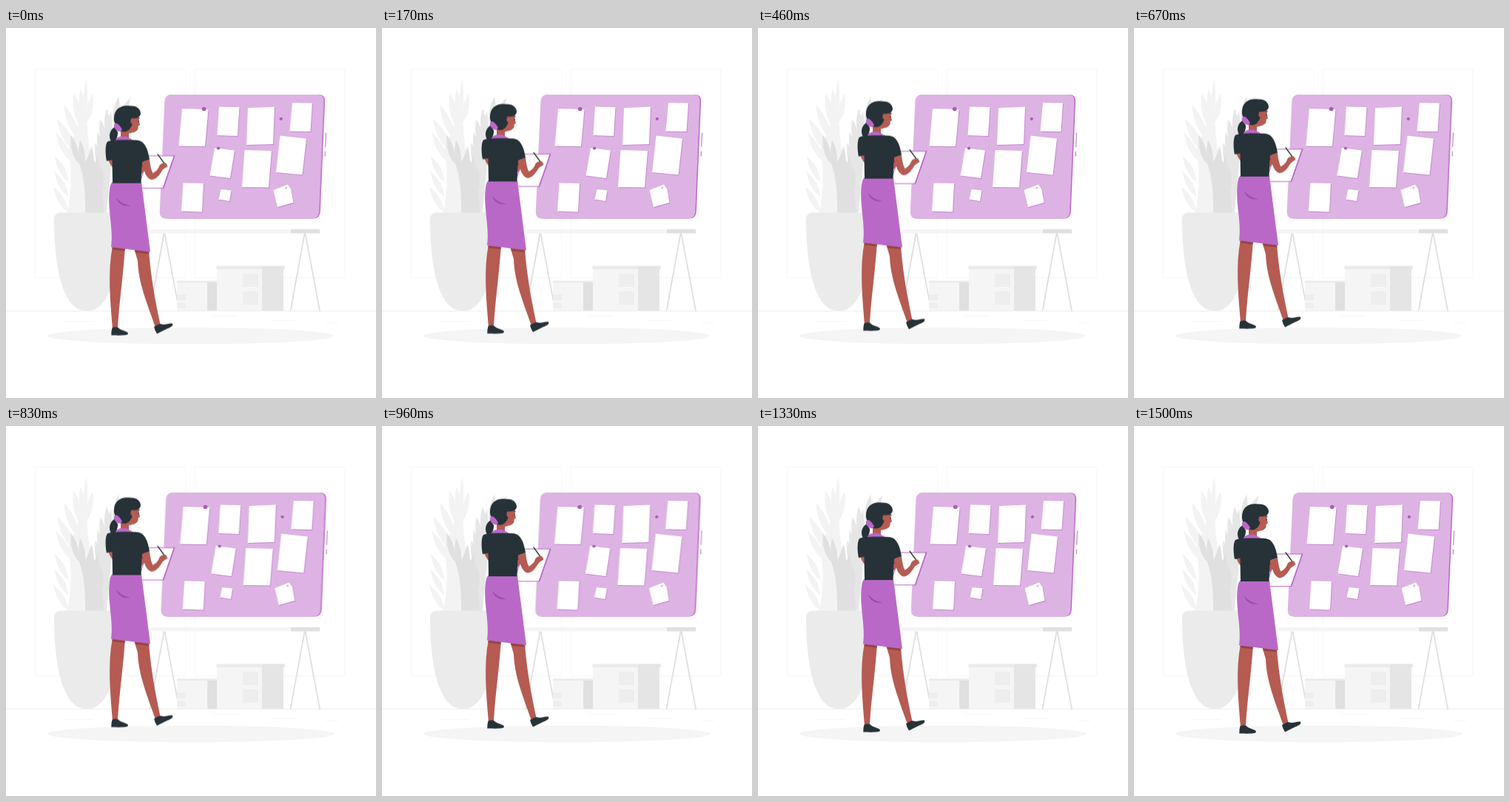
Animation, 500 px wide and 500 px high, one loop 1540 ms. Source, as an HTML page without scripts:

```html
<!DOCTYPE html>
<html lang="en">
<head>
<meta charset="utf-8">
<title>Planning board</title>
<style>
  html, body { margin: 0; width: 100%; height: 100%; overflow: hidden; background: #fff; }
  svg { display: block; width: 100%; height: 100%; }
  .board { animation: shake 1.54s linear infinite; }
  .woman { animation: float 1.54s linear infinite; }
  @keyframes float {
    0% { transform: translateY(-.3px); }
    47% { transform: translateY(-10px); }
    95.7%, 100% { transform: translateY(0); }
  }
  @keyframes shake {
    0% { transform: translateX(-.17px); }
    8.05%, 86% { transform: translateX(-1px); }
    17.8%, 76.2% { transform: translateX(2px); }
    27.5%, 47%, 66.5% { transform: translateX(-4px); }
    37.3%, 56.8% { transform: translateX(4px); }
    95.7%, 100% { transform: translateX(0); }
  }
  .dark { fill: #263238; }
  .skin { fill: #b55b52; }
  .purple { fill: #ba68c8; }
  .line { fill: none; stroke-linecap: round; }
</style>
</head>
<body>
<svg viewBox="0 0 500 500">
  <defs>
    <path id="leaf" d="M0 0C-6-12-5-26 0-40C5-26 6-12 0 0Z"/>
    <path id="panel" d="M224 90H421Q430 90 429.600 99L423.300 248Q422.800 257.500 414 257.500H216Q207.300 257.500 207.800 248L214.400 99Q215 90 224 90Z"/>
    <g id="notes">
      <path d="M238 109L273.500 110L269 160L233.500 159.500Z"/>
      <path d="M288 106.500L315.500 107L313 146L285.500 145Z"/>
      <path d="M327 108L363 106.500L361 157L325 158Z"/>
      <path d="M387 101L414 101.500L411.500 140L383.500 139.500Z"/>
      <path d="M370.500 145.500L406 149.500L400.500 198.500L365 195Z"/>
      <path d="M282 162L309 165.500L303 203L275.500 199.500Z"/>
      <path d="M322.500 165L359 166L355 215.500L319 215Z"/>
      <path d="M239.500 209.500L267 210L265 248.500L237 247.500Z"/>
      <path d="M290.500 218L304.500 219.500L302 234L287.500 231.500Z"/>
      <path d="M361.500 219L381 211.500L385.500 218L388.500 236L367 242Z"/>
    </g>
  </defs>

  <!-- room -->
  <g fill="none" stroke="#f7f7f7">
    <rect x="39.500" y="55.500" width="203" height="282" rx="1"/>
    <rect x="255" y="55.500" width="203" height="282" rx="1"/>
    <path stroke="#efefef" d="M0 382.500H500"/>
    <path d="M78 396.500H118M278 389.500H312M360 395.500H390M432 398.500H449"/>
  </g>
  <ellipse cx="249.500" cy="416" rx="194" ry="11.300" fill="#f5f5f5"/>

  <!-- plant -->
  <g fill="#f3f3f3">
    <path d="M108 69C112 84 109 104 109 122C111 165 120 200 120 250H83C88 220 90 200 84 165L98 130C105 110 104 88 108 69Z"/>
    <use href="#leaf" transform="translate(109 128) rotate(12)"/>
    <use href="#leaf" transform="translate(106 126) rotate(-7) scale(1.100)"/>
    <use href="#leaf" transform="translate(103 138) rotate(-13) scale(1.300)"/>
    <use href="#leaf" transform="translate(98 150) rotate(-23) scale(1.250)"/>
    <use href="#leaf" transform="translate(94 168) rotate(-29) scale(1.300)"/>
    <use href="#leaf" transform="translate(88 180) rotate(-28) scale(1.100)"/>
    <use href="#leaf" transform="translate(84 208) rotate(-27)"/>
    <use href="#leaf" transform="translate(84 228) rotate(-28)"/>
    <use href="#leaf" transform="translate(84 249) rotate(-30)"/>
  </g>
  <g fill="#e6e6e6">
    <path d="M142 112C148 150 140 200 136 250H118C126 210 128 150 142 112Z"/>
    <use href="#leaf" transform="translate(150 130) rotate(27)"/>
    <use href="#leaf" transform="translate(146 132) rotate(9)"/>
    <use href="#leaf" transform="translate(139 153) rotate(-4) scale(1.100)"/>
    <use href="#leaf" transform="translate(135 166) rotate(-10) scale(1.100)"/>
    <use href="#leaf" transform="translate(132 180) rotate(-12)"/>
    <use href="#leaf" transform="translate(129 194) rotate(-12)"/>
  </g>
  <g fill="#e0e0e0">
    <path d="M84 157C104 180 108 215 107 250H132C132 220 124 195 115 165L108 180L98 172Z"/>
    <use href="#leaf" transform="translate(98 183) rotate(-15)"/>
    <use href="#leaf" transform="translate(105 191) rotate(-7)"/>
    <use href="#leaf" transform="translate(113 200) rotate(4)"/>
    <use href="#leaf" transform="translate(121 212) rotate(4)"/>
    <use href="#leaf" transform="translate(127 228) rotate(2)"/>
  </g>
  <path fill="#ebebeb" d="M74 249.500H144Q153 249.500 153 259C153 325 142 382.500 109 382.500C77 382.500 65 325 65 259Q65 249.500 74 249.500Z"/>

  <!-- table and boxes -->
  <path class="line" stroke="#e0e0e0" stroke-width="1.800" d="M213.500 278L194.500 382M214.500 278L234 382M403.500 278L384.500 382M404.500 278L424 382"/>
  <path fill="#f5f5f5" d="M195 272H385V277.500H195ZM231 343H272V382H231ZM285 325H346V382H285Z"/>
  <path fill="#e0e0e0" d="M385 272H424V277.500H385ZM272 343H285V382H272Z"/>
  <path fill="#e5e5e5" d="M346 325H375V382H346ZM346 321.500H376.500V326H346Z"/>
  <path fill="#ebebeb" d="M284.500 321.500H346V326H284.500ZM231 341.500H285V344H231Z"/>
  <path fill="#eee" d="M320 332H341V350H320ZM320 356H341V374H320ZM231 360H243V368H231ZM231 371.500H243V379H231Z"/>

  <g class="board">
    <use href="#panel" x="1.500" class="purple"/>
    <use href="#panel" fill="#ddb3e3"/>
    <use href="#notes" x=".9" y=".9" fill="#c587d0"/>
    <use href="#notes" fill="#fff"/>
    <g fill="#ae58be">
      <circle cx="267.700" cy="109.500" r="2.800"/>
      <circle cx="371.800" cy="122.800" r="2.100"/>
      <circle cx="287" cy="162.500" r="2.100"/>
      <circle cx="378.800" cy="216" r="1.500" fill="#ddb3e3"/>
    </g>
    <path class="line" stroke="#ba68c8" d="M432.500 142L431.700 160.500M431.300 167V173"/>
  </g>

  <g class="woman">
    <path fill="#fff" stroke="#ba68c8" stroke-width="1.100" d="M193 173H227.500L212.500 216.700H178Z"/>
    <path class="line" stroke="#ba68c8" stroke-width="1.600" d="M227.500 173L212.500 216.500"/>

    <!-- legs -->
    <path class="skin" d="M144 295H161C158 340 153 370 151 407H144C141 370 137 330 144 295Z"/>
    <path class="skin" d="M173 298L193 301C196 340 202 370 208.500 401L202 405C190 370 179 345 178 315Z"/>
    <path fill="#91443e" d="M144 296L161 298L160.600 301.500L143.500 299.500ZM173.500 299L193 302L193.300 305.500L175 303.500Z"/>
    <path class="dark" d="M143.500 405.500C146 404 150 404.500 152 405.500C155 409 163 409.500 165 412.500C165 416 160 415.800 142.300 415.500Q142 410 143.500 405.500Z"/>
    <path class="dark" d="M200 404C204 402.500 206 399 210 400.500C215 402 221 398.500 225 399.700C226.500 403 222 405 218 406.500L204 413.500Q201 409 200 404Z"/>

    <!-- clothes -->
    <path class="purple" d="M143 209H183L195 303L142 296.500C146 270 135 240 141 213Z"/>
    <path fill="#91509c" d="M149 229.500C154 236 160 239 168 240.500C158 242 151 237 149 229.500Z"/>
    <path class="skin" d="M138 178L144 177V189Q140 184 138 178ZM182 180L187 184L187 193L183 198Z"/>
    <path class="skin" d="M155 136H166V149Q160 155 155 149Z"/>
    <path class="purple" d="M147 153C149 147 155 146 163 147L174 153Z"/>
    <path class="dark" d="M141 152.500C152 151 170 151.500 178 152C188 153.500 192 165 194 178L184.500 181.500L183.500 185L182.500 210H144L143.500 178.500L136 180C134 170 134 158 137 154Z"/>

    <!-- head -->
    <path class="skin" d="M167 119L179.500 119L179.600 126L181 131L178.600 133L178.500 136C177.500 140 173 141.500 165 143L157 138Z"/>
    <path class="dark" d="M146 125C145 110 155 104 167 105.500C177 104.500 183 111 181.800 117C180 123 173 122 169 123C168.500 127 172 129 169.500 133C165 142 157 143 152 136Q147 131 146 125Z"/>
    <ellipse class="skin" cx="170.700" cy="126" rx="2.300" ry="3.800"/>
    <path class="line" stroke="#263238" d="M178 122.300L180.300 122M179 125.800V127.200"/>
    <path class="dark" d="M147 134C140 138 138 147 142 153C147 155 151.500 149 151 141Z"/>
    <path class="purple" d="M147 129.500C150 127 155 133 157 137.500L154.500 140.500C149 140 143.500 134 147 129.500Z"/>

    <!-- writing arm -->
    <path class="line" stroke="#263238" stroke-width="1.300" d="M205 171L214.500 184"/>
    <path class="skin" d="M184 181.500L194 178C195 187 196.500 193 198.500 196.500C203 194 206 191 207 187C209 182.500 213 183 216 182.500L218.500 187C215 190 213 190 211 193C207 200 202 205 197 205.500C189 204 186 192 184 181.500Z"/>
    <path class="line" stroke="#263238" stroke-width="1.200" d="M178.500 178Q181 184 184 187"/>
  </g>
</svg>
</body>
</html>
```
